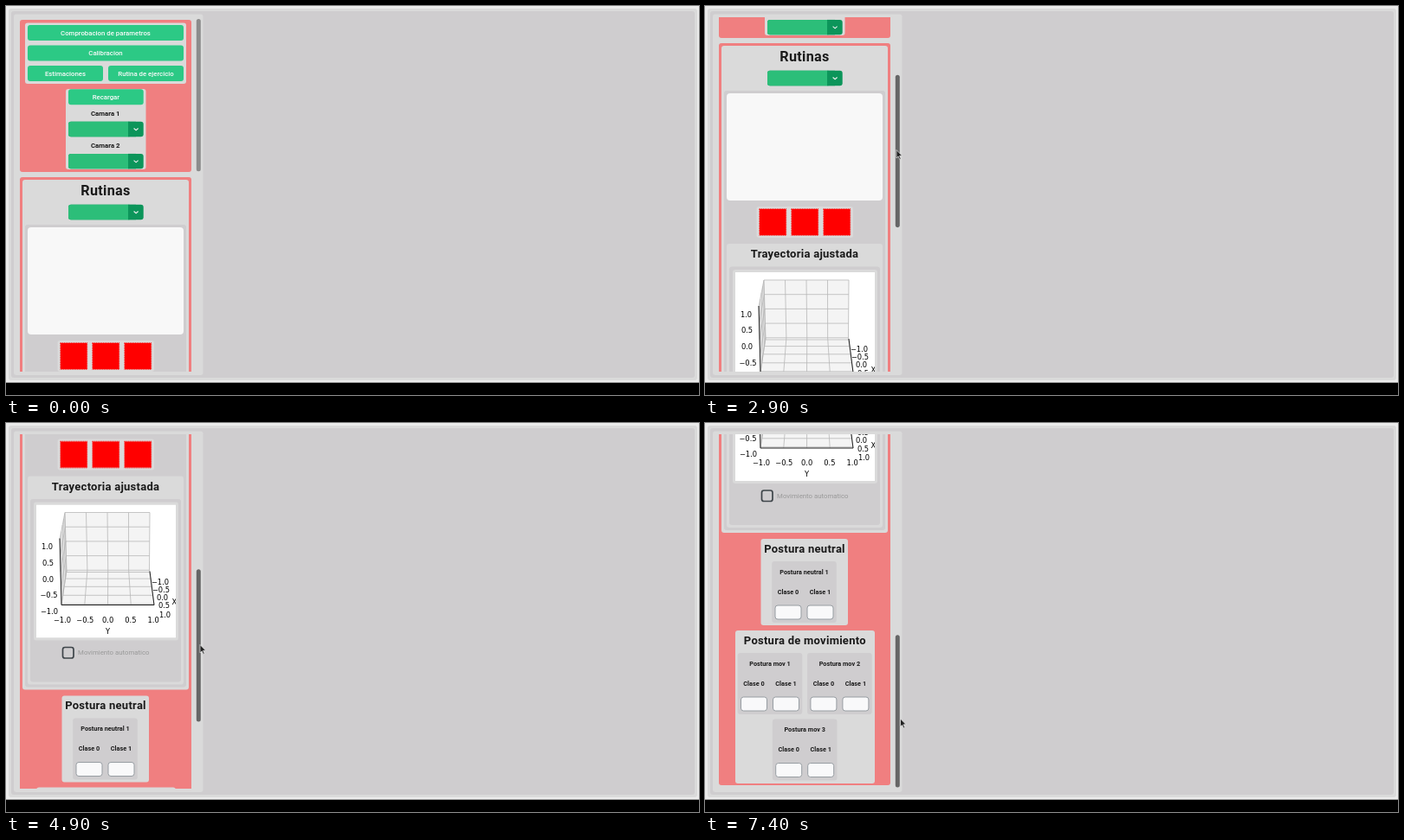
Write an HTML page that moves like this. It is 800 px wide and 450 px high and loops after 7.5 s.

```html
<!DOCTYPE html>
<html lang="es">
<head>
<meta charset="utf-8">
<style>
html, body { margin: 0; width: 100%; height: 100%; overflow: hidden; background: #000; }
svg { display: block; }
text { font-family: Roboto, sans-serif; text-anchor: middle; }
.plot text { font-family: "DejaVu Sans", sans-serif; }
</style>
</head>
<body>
<svg id="stage" width="800" height="450" viewBox="0 0 800 450"></svg>
<script>
const LIGHT = '#dadada', GRAY = '#cfcdcf', PINK = '#f07f80', GREEN = '#2cc985', INK = '#1a1a1a';

// Rectangles are given by their edges, texts by the centre of their capitals.
const box = (x0, y0, x1, y1, fill, r = 3, more = '') =>
  `<rect x="${x0}" y="${y0}" width="${x1 - x0}" height="${y1 - y0}" rx="${r}" fill="${fill}" ${more}/>`;
const label = (s, x, y, size = 7.8, fill = INK, weight = 700, gap = 0) =>
  `<text x="${x}" y="${y + size * .36}" font-size="${size}" fill="${fill}" font-weight="${weight}" letter-spacing="${gap}">${s}</text>`;
const title = (s, x, y, size = 13) => label(s, x, y, size, INK, 700, size / 50);
const path = (d, stroke, width, fill = 'none') =>
  `<path d="${d}" stroke="${stroke}" stroke-width="${width}" fill="${fill}"/>`;

const button = (s, x0, x1, y) =>
  box(x0, y - 9, x1, y + 9, GREEN) + label(s, (x0 + x1) / 2, y, 7.8, '#fafafa', 500);

const dropdown = y =>
  box(72, y - 8.7, 158.7, y + 8.7, '#0c955a') + box(72, y - 8.7, 145, y + 8.7, '#2cbe79') +
  box(141, y - 8.7, 150, y + 8.7, '#0c955a', 0) +
  path(`M147.6 ${y - 1}l2.5 2.2l2.5 -2.2`, '#f0f0f0', 1.1);

const entry = (x, y) =>
  box(x - 15, y - 8, x + 15, y + 8, '#f9f9fa', 3, 'stroke="#979da2"');

const posture = (s, x, y) =>
  box(x - 37.3, y, x + 37.3, y + 71, GRAY) + label(s, x, y + 12, 7.3) +
  [0, 1].map(i => {
    const cx = x - 18.5 + 37 * i;
    return label('Clase ' + i, cx, y + 35, 7.3) + entry(cx, y + 59);
  }).join('');

const redSquare = x =>
  box(x + .5, 390, x + 31, 420, '#f00', 0) +
  box(x + .3, 389.7, x + 31.2, 420.4, 'none', 0, 'stroke="#f00" stroke-dasharray="1 1"');

const mix = (a, b, f) => a + (b - a) * f;

function plot() {
  const grid = [];
  const line = (...p) => grid.push('M' + p.join(' '));
  for (let i = 0; i < 5; i++) {
    const f = i / 4, y = 176 + 16.7 * i;
    line(62 + f * 2, 207 + 18.7 * i, 68 + f * 2, y, 166 - f * .5, y);
    line(mix(68, 166, f), 176, mix(70, 165.5, f), 243, mix(64, 171, f), 283);
  }
  for (const f of [.05, .24, .47, .72, .97]) {
    const x = mix(70, 64, f), y = mix(243, 283, f);
    line(mix(68, 62, f), mix(176, 207, f), x, y, mix(165.5, 171, f), y);
  }
  const ticks = ['−1.0', '−0.5', '0.0', '0.5', '1.0'];
  const num = (s, x, y) => label(s, x, y, 8.3, '#000', 400);
  const zx = [50, 49.5, 48.5, 48.5, 47.5];
  const xs = [[178, 256.5], [179, 265.5], [180.5, 274.5], [182.5, 284], [183.5, 294.5]];
  return '<g class="plot" transform="translate(0 296)" clip-path="url(#figure)">' +
    box(35, 167, 196, 321, '#fff', 0) +
    path('M68 176H166L165.5 243L171 283H64L62 207Z', 'none', 0, '#f4f4f4') +
    path(grid.join(''), '#b8b8b8', .8) +
    path('M62 206L64 283H171L166 244', '#222', 1) +
    ticks.map((s, i) => num(s, zx[i], 290.5 - 18.7 * i) +
      num(s, 65 + 26.3 * i, 300.5) + num(s, ...xs[i])).join('') +
    num('Y', 117.5, 313.5) + num('X', 194.3, 280) + '</g>';
}

const content =
  box(16, 16, 214, 192, PINK) + box(22, 19.5, 208, 90, LIGHT) +
  button('Comprobacion de parametros', 25, 205, 31) +
  button('Calibracion', 25, 205, 54.5) +
  button('Estimaciones', 25, 112, 78) + button('Rutina de ejercicio', 118, 205, 78) +
  box(69, 96, 161.5, 189, LIGHT) + button('Recargar', 72, 158.7, 105.3) +
  label('Camara 1', 114.8, 124) + dropdown(142.5) +
  label('Camara 2', 114.8, 160.7) + dropdown(179.6) +
  box(16, 198, 214, 969, PINK) + box(19, 201, 211, 677, LIGHT) +
  title('Rutinas', 115, 213.5, 16.2) + dropdown(238.5) +
  box(22, 253, 208, 674, GRAY) + box(25, 256, 205, 380, '#f8f8f8', 4) +
  box(59.5, 387, 171, 423, LIGHT) + [62.5, 99.5, 136.5].map(redSquare).join('') +
  box(25, 430, 205, 671, LIGHT) + title('Trayectoria ajustada', 115, 441.5) +
  box(28, 456.5, 202, 668, GRAY) + box(32, 460, 199, 620, LIGHT) + plot() +
  box(65.5, 628, 78, 640.5, 'none', 2.5, 'stroke="#3e454a" stroke-width="1.7"') +
  label('Movimiento automatico', 124.3, 634, 7.8, '#999', 400) +
  box(64.5, 684, 165, 784, LIGHT) + title('Postura neutral', 115, 695.3) +
  posture('Postura neutral 1', 114.5, 710) +
  box(35, 790, 196, 967, LIGHT) + title('Postura de movimiento', 115.3, 801.7) +
  posture('Postura mov 1', 75, 816) + posture('Postura mov 2', 155.4, 816) +
  posture('Postura mov 3', 115.2, 892.5);

const $ = id => document.getElementById(id);
$('stage').innerHTML =
  `<clipPath id="view">${box(16, 13, 214, 423, '#000', 0)}</clipPath>
   <clipPath id="figure">${box(35, 167, 196, 321, '#000', 0)}</clipPath>` +
  box(0, 0, 800, 435.7, '#ebebeb', 0) + box(3, 3, 798, 433, LIGHT) +
  box(6, 6, 795, 430, GRAY) + box(9, 9.5, 227.5, 427, LIGHT) +
  `<g clip-path="url(#view)"><g id="content">${content}</g></g>` +
  box(219.8, 15, 224.8, 191.3, '#8c8c8c', 2.5, 'id="thumb"') +
  `<g id="cursor">${path('M0 0V9.4L2.1 7.4L3.7 10.9L5.2 10.2L3.6 6.8H6.6Z', '#eee', .7, '#222')}</g>`;

// time, pointer x, pointer y, scroll
const keys = [
  [1200, 264, 100, 0], [1600, 229.5, 79, 0], [2000, 221.5, 101.5, 0],
  [2900, 221, 166.5, 155], [4300, 223, 226, 296], [5500, 225, 287, 441],
  [6300, 225, 331, 542], [6400, 225, 334, 550], [6700, 225.5, 342, 550], [7500, 225.5, 342, 550]
];

function pose(t) {
  if (t <= keys[0][0]) return keys[0];
  const n = keys.findIndex(k => k[0] >= t), a = keys[n - 1], b = keys[n];
  const f = (t - a[0]) / (b[0] - a[0]);
  return a.map((v, i) => mix(v, b[i], f));
}

function draw(now) {
  const t = Math.floor(now % 7500 / 100) * 100;
  const [, x, y, scroll] = pose(t);
  $('content').setAttribute('transform', `translate(0 ${-scroll})`);
  $('thumb').setAttribute('y', 15 + scroll * .4185);
  $('thumb').setAttribute('fill', x < 226 ? '#666' : '#8c8c8c');
  $('cursor').setAttribute('transform', `translate(${x} ${y})`);
  $('cursor').setAttribute('visibility', t < keys[0][0] ? 'hidden' : 'visible');
}

const start = performance.now();
function tick() {
  draw(performance.now() - start);
  requestAnimationFrame(tick);
}
tick();
</script>
</body>
</html>
```
